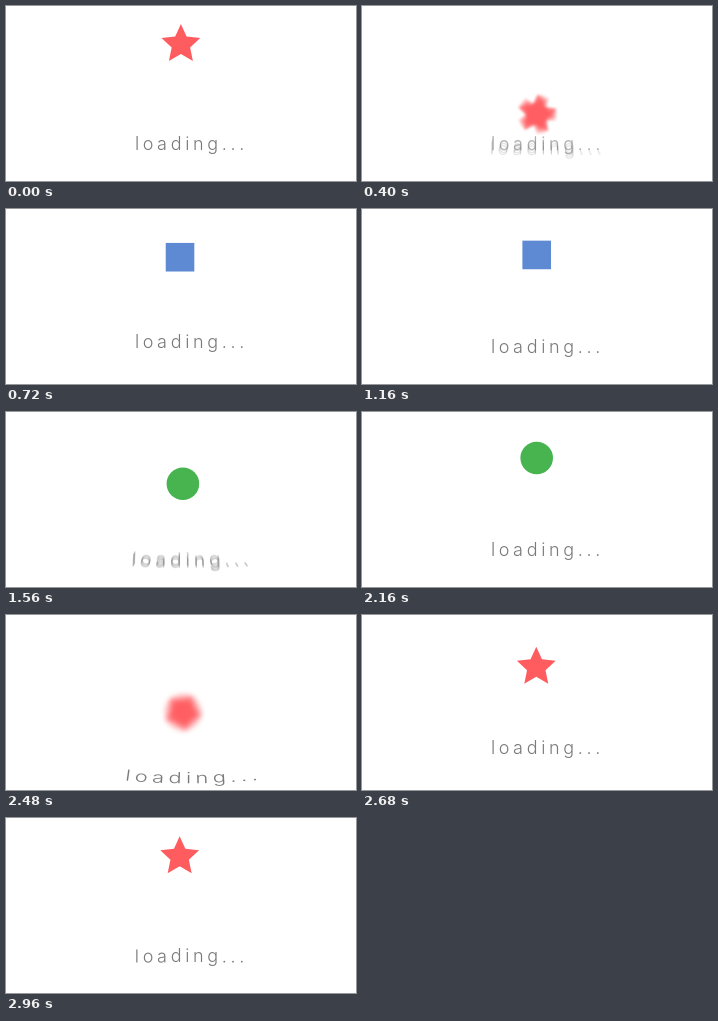
An HTML page that plays this animation: 350x175 px, repeating every 3000 ms.

```html
<!DOCTYPE html>
<html lang="en">
<head>
<meta charset="utf-8">
<title>Loading</title>
<style>
  html, body { margin: 0; width: 100%; height: 100%; overflow: hidden; background: #fff; }
  svg { display: block; width: 100vw; height: 100vh; }
  text { font: 300 18px Inter, Roboto, sans-serif; fill: #7a7a7a; }
</style>
</head>
<body>
<svg viewBox="0 0 350 175">
  <filter id="soften" x="-50%" y="-50%" width="200%" height="200%" color-interpolation-filters="sRGB">
    <feGaussianBlur id="blur" stdDeviation="0"/>
  </filter>
  <g id="shape"></g>
  <g id="label"></g>
</svg>
<script>
const LOOP = 3000, BEAT = 1000, STEP = 40;
const WORD = "loading...", SPACING = 3.65, TEXT_X = 183.6, BASELINE = 143.7;
const HIT = 0.4, SWITCH = 0.46, SPIN_START = 0.38, SPIN_LENGTH = 0.18;
const SVG_NS = "http://www.w3.org/2000/svg";
const byId = id => document.getElementById(id);

// All motion is a function of the phase (0 to 1) within one bounce.
const shapeDrop = p => Math.max(0, Math.min(
  630 * p ** 2.4,
  61 * Math.exp(-6.7 * (p - .48)) - 2.2));
const shapeX = p => 174.9 - 1.3 * p + 3.2 * Math.exp(-(((p - .52) / .1) ** 2));
const spinProgress = p => Math.min(1, Math.max(0, (p - SPIN_START) / SPIN_LENGTH));
const spinAngle = p => {
  const u = spinProgress(p);
  return 360 * u * u * (3 - 2 * u);
};
const spinSpeed = p => {
  const u = spinProgress(p);
  return 4 * u * (1 - u);
};
// The word is knocked down and settles like a damped spring.
const textDrop = p => {
  const s = Math.max(0, p - HIT);
  return 48.6 * Math.exp(-7.5 * s) * Math.sin(14.6 * s);
};
const textStretch = p => (Math.max(0, textDrop(p)) / 24.5) ** 1.3;

function set(node, attributes) {
  for (const key in attributes) node.setAttribute(key, attributes[key]);
}

function addLayers(parent, name, count) {
  return Array.from({ length: count }, () =>
    parent.appendChild(document.createElementNS(SVG_NS, name)));
}

// Spreads the layers over a short exposure, or shows one sharp layer.
function expose(layers, phase, shutter, opacity, place) {
  layers.forEach((node, i) => {
    const offset = shutter * (i / (layers.length - 1) - .5);
    place(node, phase + offset);
    set(node, { opacity: shutter ? opacity : i ? 0 : 1 });
  });
}

function starPath(outer, inner) {
  const points = Array.from({ length: 10 }, (_, i) => {
    const angle = Math.PI * (i / 5 - .5), radius = i % 2 ? inner : outer;
    return `${radius * Math.cos(angle)} ${radius * Math.sin(angle)}`;
  });
  return `M${points.join("L")}Z`;
}

const shapes = [
  { path: starPath(20.4, 9.7), color: "#ff5c60", y: 38.4 },
  { path: "M-14.3-14.3H14.3V14.3H-14.3Z", color: "#5e8ad4", y: 38.2 },
  { path: "M-16.3 0A16.3 16.3 0 1 1 16.3 0A16.3 16.3 0 1 1-16.3 0Z", color: "#47b450", y: 38.2 }
];
const shapeLayers = addLayers(byId("shape"), "path", 12);
const textLayers = addLayers(byId("label"), "text", 6);
textLayers.forEach((node, i) => {
  node.textContent = WORD;
  if (i) set(node, { "aria-hidden": true });
});

// Letter positions from natural advances plus tracking, centred on zero.
const pen = document.createElement("canvas").getContext("2d");
pen.font = "300 18px Inter, Roboto, sans-serif";
const widths = [...WORD].map(c => pen.measureText(c).width);
const total = widths.reduce((sum, w) => sum + w + SPACING, -SPACING);
let cursor = -total / 2;
const letters = widths.map(width => {
  const x = cursor;
  cursor += width + SPACING;
  return { x, side: (x + width / 2) / (total / 2) };
});

function placeText(node, phase) {
  const stretch = textStretch(phase);
  const list = rule => letters.map(letter => rule(letter).toFixed(2)).join(" ");
  set(node, {
    x: list(({ x }) => x),
    y: list(({ side }) => -3.6 * stretch * side * side),
    rotate: list(({ side }) => -6 * stretch * side),
    transform: `translate(${TEXT_X + 1.8 * stretch} ${BASELINE + textDrop(phase)})`
      + ` scale(${1 + .22 * stretch} ${1 - .15 * stretch})`
  });
}

function drawText(phase) {
  const shutter = .016;
  const travel = textDrop(phase + shutter / 2) - textDrop(phase - shutter / 2);
  expose(textLayers, phase, Math.abs(travel) > 2 ? shutter : 0, .22, placeText);
}

function drawShape(time, phase) {
  const index = Math.floor(time / BEAT + 1 - SWITCH) % shapes.length;
  const { path, color, y } = shapes[index];
  const speed = spinSpeed(phase), spinning = speed > .01;
  set(byId("blur"), { stdDeviation: 2.2 * speed });
  set(byId("shape"), {
    fill: color,
    filter: spinning ? "url(#soften)" : "none",
    transform: `translate(${shapeX(phase)} ${y + shapeDrop(phase)})`
  });
  expose(shapeLayers, phase, spinning ? .03 : 0, .25, (node, p) =>
    set(node, { d: path, transform: `rotate(${spinAngle(p)})` }));
}

function draw(elapsed) {
  const time = Math.floor(elapsed % LOOP / STEP) * STEP;
  const phase = time % BEAT / BEAT;
  drawShape(time, phase);
  drawText(phase);
}

const start = performance.now();
function tick(now) {
  draw(Math.max(0, now - start));
  requestAnimationFrame(tick);
}
draw(0);
requestAnimationFrame(tick);
</script>
</body>
</html>
```
